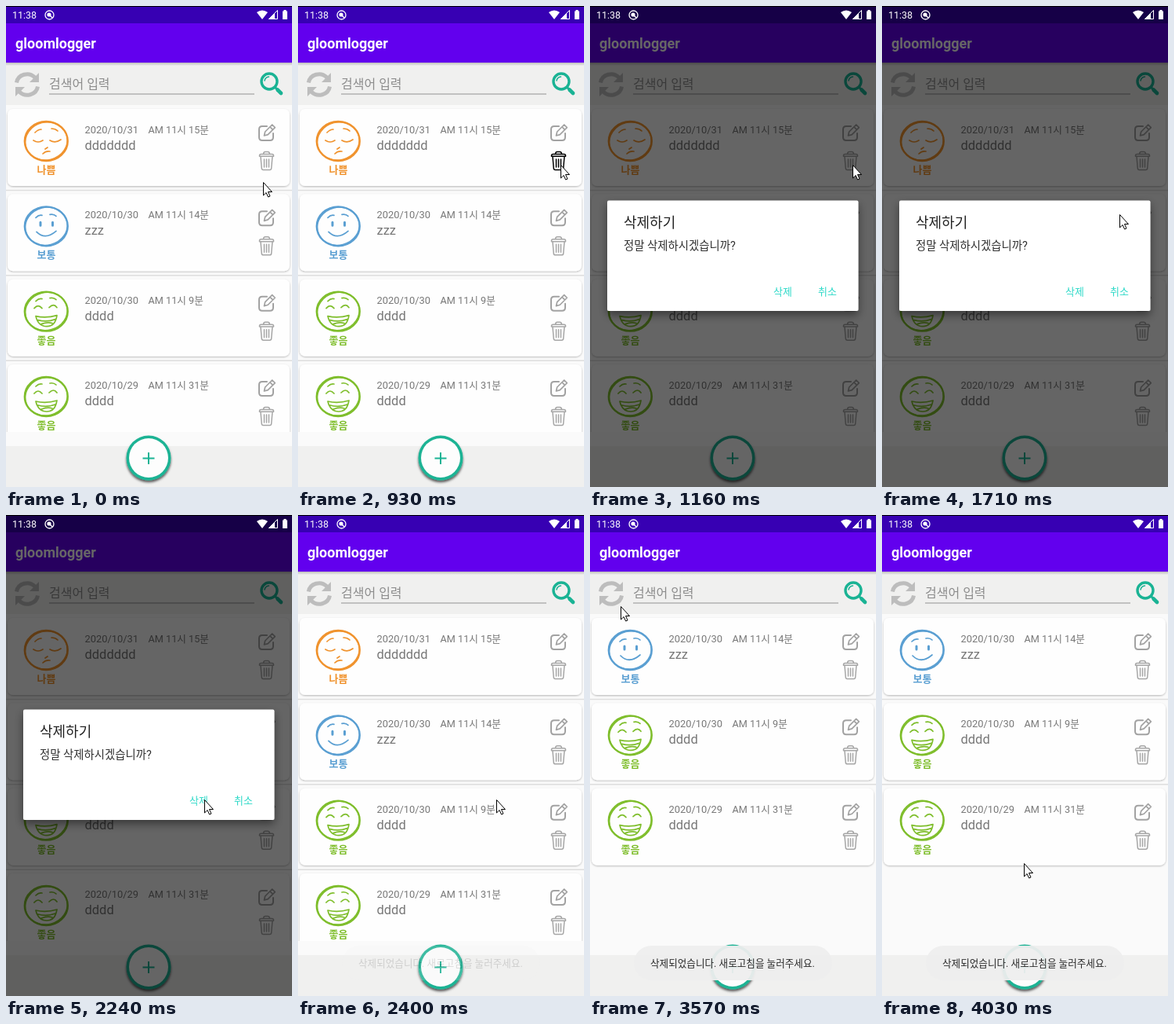
Animation, 365 px wide and 612 px high, one loop 4.11 s. Source, as an HTML page:

```html
<!DOCTYPE html>
<html lang="ko">
<head>
<meta charset="utf-8">
<title>Mood diary</title>
<style>
  html, body { margin: 0; width: 100%; height: 100%; overflow: hidden; background: #fafafa; }
  svg { display: block; }
  text { font-family: Roboto, 'Noto Sans CJK KR', 'Noto Sans CJK', sans-serif; }
  .line { fill: none; stroke-linecap: round; stroke-linejoin: round; }
</style>
</head>
<body>
<svg id="stage" width="365" height="612" viewBox="0 0 365 612">
  <defs>
    <filter id="soft" x="-20%" y="-20%" width="140%" height="150%"><feDropShadow dx="0" dy="1" stdDeviation="1" flood-opacity=".28"/></filter>
    <filter id="deep" x="-20%" y="-20%" width="140%" height="150%"><feDropShadow dx="0" dy="5" stdDeviation="6" flood-opacity=".45"/></filter>
    <filter id="lift" x="-30%" y="-30%" width="160%" height="160%"><feDropShadow dx="0" dy="2.5" stdDeviation="1.5" flood-opacity=".65"/></filter>
    <linearGradient id="fade" x2="0" y2="1"><stop stop-opacity=".22"/><stop offset="1" stop-opacity="0"/></linearGradient>
    <clipPath id="view"><path d="M0 127H365V542H0z"/></clipPath>
    <g id="edit" class="line" stroke="#a2a2a2" stroke-width="2">
      <path d="M333 23h-6q-4 0-4 4v10q0 4 4 4h10q4 0 4-4v-5"/>
      <path d="M329.500 35l1.200-5 9-9 3.600 3.600-9 9zM337 23.800l3.500 3.500" stroke-width="1.700"/>
    </g>
    <g id="bin" class="line" stroke-width="1.500">
      <path d="M323.500 59.500q0-2 2-2h14q2 0 2 2v.8h-18zM328.500 57.500q0-3 2.500-3h3q2.500 0 2.500 3M325 60.500l1.300 15q.2 2 2 2h8.400q1.800 0 2-2l1.300-15M329.500 64v10M332.500 64v10M335.500 64v10"/>
    </g>
  </defs>

  <path fill="#fafafa" d="M0 0H365V612H0z"/>
  <path fill="#f0f0ef" d="M0 72H365V126H0zM0 560H365V612H0z"/>
  <path fill="url(#fade)" d="M0 72H365V76H0z"/>
  <path fill="#6200ee" d="M0 22H365V72H0z"/>
  <path fill="#3700b3" d="M0 0H365V22H0z"/>
  <path d="M0 0H365V1H0z"/>
  <text x="12" y="54" font-size="18" font-weight="700" fill="#fff">gloomlogger</text>

  <g class="line" stroke="#bdbdbd" stroke-width="5" style="stroke-linecap:butt">
    <path d="M13.500 97.500A13.500 12.500 0 0 1 37 91M40.500 102.500A13.500 12.500 0 0 1 17 109"/>
    <path d="M42 85v12H30zM12 115v-12h12z" fill="#bdbdbd" stroke="none"/>
  </g>
  <text x="55" y="105" font-size="16" fill="#8c8c8c">검색어 입력</text>
  <path stroke="#929292" d="M55 112H317"/>
  <g class="line" stroke="#1ab394">
    <circle cx="336" cy="96" r="10" stroke-width="3.400"/>
    <path d="M343.500 103.500l2.500 2.500" stroke-width="3"/>
    <path d="M346.500 106.500l4.500 4.500" stroke-width="4.600"/>
    <path d="M330 95q1-4.500 5.500-5" stroke-width="1.500"/>
  </g>

  <g id="list" clip-path="url(#view)"></g>

  <g filter="url(#lift)"><circle cx="182" cy="575" r="28.500" fill="#1ab394"/></g>
  <circle cx="182" cy="575" r="25" fill="#fdfdfd"/>
  <path d="M174.500 575.500h15M182 568v15" stroke="#1ab394" stroke-width="2"/>

  <path id="scrim" d="M0 1H365V612H0z"/>

  <g fill="#fff">
    <text x="8" y="16" font-size="12.500">11:38</text>
    <circle cx="55.500" cy="11.500" r="5.500" fill="none" stroke="#fff" stroke-width="1.300"/>
    <circle cx="55" cy="11" r="2.600"/><path d="M55 11l4 4" stroke="#fff" stroke-width="1.500"/>
    <path d="M320 8q7-5 14 0l-7 9z"/>
    <path d="M346.500 5.500v11h-11z" fill="none" stroke="#fff"/><path d="M343 9v8h-8z"/>
    <path d="M353 6.500h1.500V5h3v1.500H359V17h-6z"/>
  </g>

  <g id="dialog">
    <rect x="22" y="247.500" width="320.500" height="140.500" rx="2" fill="#fff" filter="url(#deep)"/>
    <text x="43" y="282" font-size="18" fill="#212121">삭제하기</text>
    <text x="43" y="310" font-size="14.400" fill="#303030">정말 삭제하시겠습니까?</text>
    <circle id="ripple" cx="253" cy="362" r="12" fill="#03dac5" opacity=".1"/>
    <g font-size="13" font-weight="500" fill="#2ed9c8">
      <text x="234" y="367.500">삭제</text><text x="291" y="367.500">취소</text>
    </g>
  </g>

  <g id="toast">
    <rect x="56" y="548" width="253" height="44" rx="22" fill="#eee" fill-opacity=".94"/>
    <text x="77" y="574.500" font-size="12.600" fill="#2a2a2a">삭제되었습니다. 새로고침을 눌러주세요.</text>
  </g>

  <path id="cursor" d="M0 0v16.500l3.600-3.500 2.500 5.500 2.400-1-2.500-5.500h5z" fill="#fff" stroke="#000"/>
</svg>
<script>
const $ = id => document.getElementById(id);
const LOOP = 4110, TICK = 77.5, PITCH = 108.33;

const moods = {
  bad: ['나쁨', '#f0932e', `<path d="M37 30q4-4 8-4M58 25q5 0 8 3M35 40q6 4 12 0M56 40q7 4 14-1M47 57q4-4 9-3M53 49l-3 2"/>`],
  fair: ['보통', '#5a9fd2', `<path d="M44 36v4M59.500 36v4" stroke-width="3"/><path d="M39 48q11 11 25-1M38 30q4-4 8-3M56 26q5-1 8 2"/>`],
  good: ['좋음', '#7fbe2c', `<path d="M38 28q4-4 8-3M56 24q5-1 8 2M36 37q5-6 10 0M55 36q6-6 10 0M38 47q13 3 27-1-2 14-13 14T38 47zM41 52q11 3 22-1M45 57q8-3 14-1"/>`]
};

function card([mood, date, time, note], i) {
  const [label, color, face] = moods[mood];
  const divider = i ? '<path d="M0-4.800H365" stroke="#dedede" stroke-width="1.500"/>' : '';
  return `<g transform="translate(0 ${131 + i * PITCH})">${divider}
    <rect x="2" width="360" height="98" rx="7" fill="#fefefe" filter="url(#soft)"/>
    <g class="line" color="${color}" stroke="${color}" stroke-width="1.700">
      <ellipse cx="51.300" cy="41" rx="27.500" ry="25" stroke-width="2.300"/>
      <ellipse cx="51.500" cy="41" rx="27" ry="24" transform="rotate(-14 51 41)" stroke-width="1.600"/>${face}
    </g>
    <text x="51.500" y="82" font-size="13" font-weight="700" text-anchor="middle" fill="${color}">${label}</text>
    <g fill="#787878">
      <text x="100.500" y="31" font-size="12.900">${date}</text>
      <text x="181.500" y="31" font-size="12.700">${time}</text>
      <text x="100.500" y="52" font-size="16.500">${note}</text>
    </g>
    <use href="#edit" y="-1"/><use class="bin" href="#bin" stroke="#a6a6a6"/>
  </g>`;
}

const entries = [
  ['bad', '2020/10/31', 'AM 11시 15분', 'ddddddd'],
  ['fair', '2020/10/30', 'AM 11시 14분', 'zzz'],
  ['good', '2020/10/30', 'AM 11시 9분', 'dddd'],
  ['good', '2020/10/29', 'AM 11시 31분', 'dddd']
];
const group = list => `<g>${list.map(card).join('')}</g>`;
$('list').innerHTML = group(entries) + group(entries.slice(1));
const [before, after] = $('list').children;
const firstBin = before.querySelector('.bin');

// Pointer stops: tick, x, y
const stops = [
  [0, 328.5, 224.5], [2, 335.5, 202.5], [19, 335.5, 202.5], [26, 253.5, 362.5],
  [31, 253.5, 362.5], [37, 68.5, 127.5], [39, 62.5, 118.5], [42, 38.5, 84.5],
  [44, 31.5, 97.5], [45, 31.5, 97.5], [52, 181.5, 443.5]
];
const clamp = v => Math.max(0, Math.min(1, v));
const ease = v => v * v * (3 - 2 * v);

function pointer(n) {
  const i = Math.max(1, stops.findIndex(s => s[0] >= Math.min(n, 52)));
  const a = stops[i - 1], b = stops[i];
  const k = ease(clamp((n - a[0]) / (b[0] - a[0])));
  return [1, 2].map(j => Math.round(a[j] + (b[j] - a[j]) * k - .5) + .5);
}

function draw(now) {
  const n = Math.floor(now % LOOP / TICK + .25);
  const open = n >= 14 && n < 31 ? clamp((n - 13) / 2) : 0;
  const show = (el, on) => el.style.display = on ? '' : 'none';
  $('cursor').setAttribute('transform', `translate(${pointer(n)})`);
  firstBin.setAttribute('stroke', n === 11 ? '#555' : n === 12 || n === 13 ? '#000' : '#a6a6a6');
  $('scrim').setAttribute('opacity', open * .6);
  $('dialog').setAttribute('opacity', open);
  show($('ripple'), n === 28);
  $('toast').setAttribute('opacity', clamp((n - 30) / 6));
  show(before, n < 46);
  show(after, n >= 46);
  requestAnimationFrame(draw);
}
requestAnimationFrame(draw);
</script>
</body>
</html>
```
